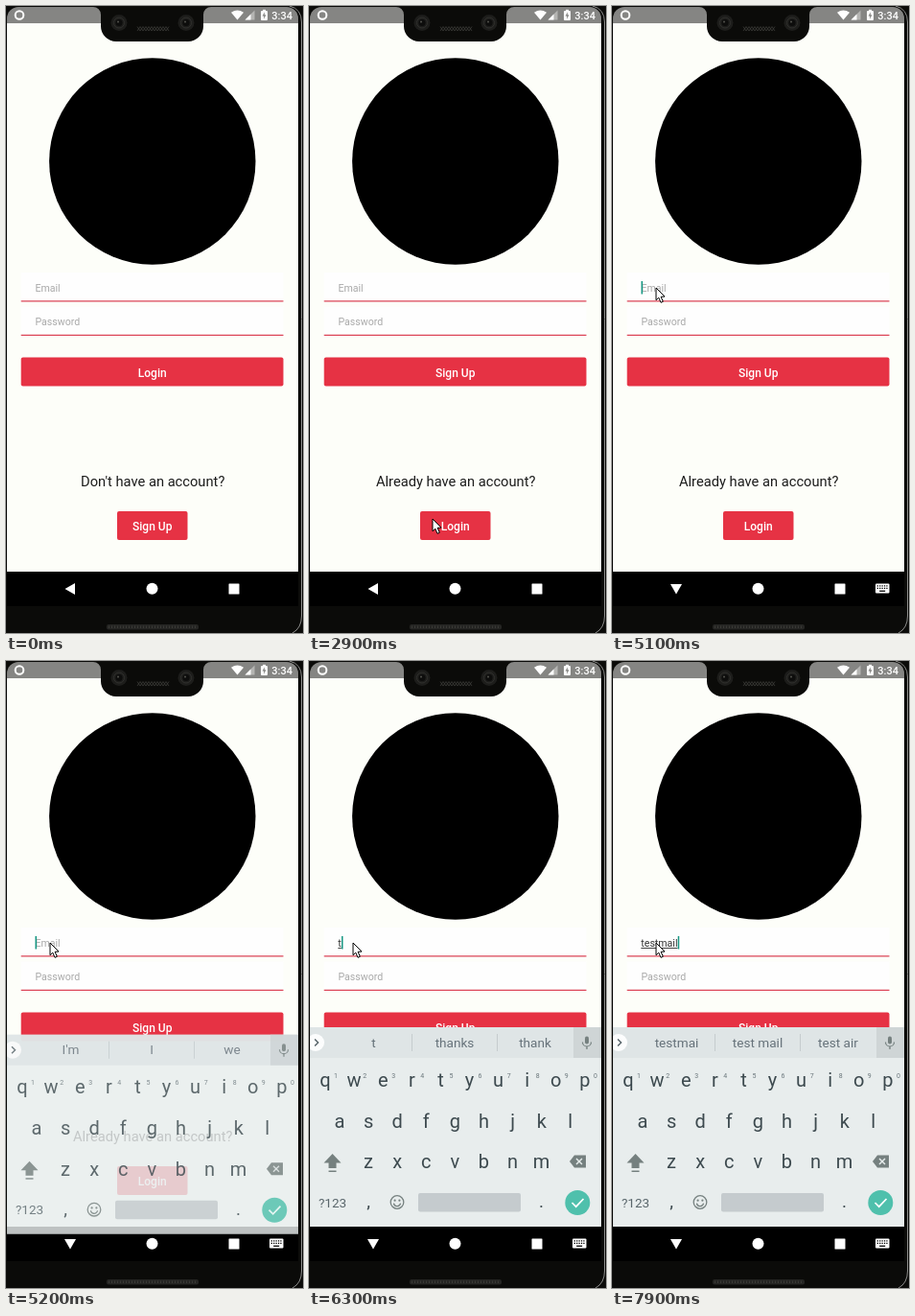
Write an HTML page with a canvas that moves like this. It is 310 by 654 pixels and loops after 8000 ms.

```html
<!DOCTYPE html>
<html lang="en">
<head>
<meta charset="utf-8">
<title>Login screen</title>
<style>
html, body { margin: 0; width: 100%; height: 100%; overflow: hidden; background: #0b0b09; }
canvas { display: block; width: 310px; height: 654px; }
</style>
</head>
<body>
<canvas id="stage"></canvas>
<script>
const W = 310, H = 654, LOOP = 8000, STEP = 100;
const RED = '#e63244', PAGE = '#fdfef9', KEY = '#3d4a4f', ICON = '#75807f', TEAL = '#4fc0ac';
const BODY = '#0b0b09', BAR = '#858583';
const canvas = document.getElementById('stage');
const ctx = canvas.getContext('2d');
const dpr = window.devicePixelRatio || 1;
canvas.width = W * dpr;
canvas.height = H * dpr;

// time, x, y of the pointer; no position hides it
const pointerPath = [
  [500, 83, 543], [600, 100, 543], [700, 122, 544], [800, 138, 543], [900, 131, 541],
  [2900, 128, 535], [3000, 98, 490], [3100, 55, 438], [3200],
  [3400, 34, 290], [3500, 43, 287], [3700, 44, 288], [3800, 45, 290], [4200, 45, 292], [4400, 45, 294]
];
const typing = [
  [6300, 't'], [6400, 'te'], [6700, 'tes'], [7000, 'test'], [7400, 'testm'],
  [7600, 'testma'], [7700, 'testmai'], [7900, 'testmail']
];
const hints = [
  [0, "I'm", 'I', 'we'],
  [6300, 't', 'thanks', 'thank'],
  [6400, 'te', 'the', 'tell'],
  [6700, 'tes', 'test', 'tea'],
  [7100, 'test', 'tests', 'testing'],
  [7400, 'testm', 'test', 'tests'],
  [7600, 'testma', 'test ma', 'test me'],
  [7700, 'testmai', 'test mail', 'test air']
];

const latest = (list, t) => list.filter(row => row[0] <= t).pop();

function rect(x, y, w, h, color, r = 0) {
  ctx.fillStyle = color;
  ctx.beginPath();
  ctx.roundRect(x, y, w, h, r);
  ctx.fill();
}

function disc(x, y, r, color) {
  ctx.fillStyle = color;
  ctx.beginPath();
  ctx.arc(x, y, r, 0, Math.PI * 2);
  ctx.fill();
}

function ring(x, y, r, color, width) {
  ctx.strokeStyle = color;
  ctx.lineWidth = width;
  ctx.beginPath();
  ctx.arc(x, y, r, 0, Math.PI * 2);
  ctx.stroke();
}

function trace(points) {
  ctx.beginPath();
  for (let i = 0; i < points.length; i += 2) ctx.lineTo(points[i], points[i + 1]);
}

function poly(points, color) {
  trace(points);
  ctx.closePath();
  ctx.fillStyle = color;
  ctx.fill();
}

function line(points, color, width) {
  trace(points);
  ctx.strokeStyle = color;
  ctx.lineWidth = width;
  ctx.stroke();
}

function text(s, x, y, size, color, align = 'center', weight = 400) {
  ctx.font = `${weight} ${size}px Roboto, sans-serif`;
  ctx.textAlign = align;
  ctx.fillStyle = color;
  ctx.fillText(s, x, y);
}

function button(label, x, y, w) {
  rect(x, y, w, 30, RED, 2);
  text(label, 152.7, y + 20, 12, '#fff', 'center', 500);
}

function field(y, label) {
  rect(15.7, y, 273.8, 29, '#fefefe');
  rect(15.7, y + 29.2, 273.8, 1.3, '#dc4558');
  if (label) text(label, 30.4, y + 19.5, 10.6, '#a9a9a9', 'left');
}

function drawForm(t) {
  const signUp = t >= 1400;
  const typed = (latest(typing, t) || [0, ''])[1];
  rect(1, 18, 304, 572, PAGE);
  disc(152.8, 162, 107.7, '#000');

  field(278, typed ? '' : 'Email');
  field(313.5, 'Password');
  let caretX = 30.5;
  if (typed) {
    text(typed, 30.3, 297.7, 10.6, '#333', 'left');
    const w = ctx.measureText(typed).width;
    rect(30.3, 299, w, 1, '#444');
    caretX += w;
  }
  const caretOn = t >= 4900 && (typed || t < 5400 || t >= 5900);
  if (caretOn) rect(caretX, 287, 1.5, 13.5, '#159682');

  button(signUp ? 'Sign Up' : 'Login', 15.7, 366.5, 273.8);
  text(signUp ? 'Already have an account?' : "Don't have an account?", 153.2, 500.5, 14.7, '#1c1c1c');
  button(signUp ? 'Login' : 'Sign Up', 116, 527, 73.5);
}

function drawNav(t) {
  rect(1, 590, 304, 36, '#000');
  const turn = Math.min(Math.max((t - 4900) / 200, 0), 1);
  ctx.save();
  ctx.translate(67, 608);
  ctx.rotate(-turn * Math.PI / 2);
  poly([-5.5, 0, 5, -6, 5, 6], '#fff');
  ctx.restore();
  disc(152.5, 607.7, 6, '#fff');
  rect(232.5, 602.5, 11, 11, '#fff', 0.5);
  if (t >= 5000) drawKeyboardIcon();
}

function drawKeyboardIcon() {
  rect(275, 602.5, 14.5, 10, '#fff', 1);
  for (let row = 0; row < 2; row++)
    for (let col = 0; col < 5; col++) rect(276.7 + col * 2.4, 604.2 + row * 2.5, 1.3, 1.3, '#000');
  rect(279.2, 609.6, 6, 1.3, '#000');
}

function drawKeyboard(t) {
  if (t < 5200) return;
  const [drop, alpha] = t < 5300 ? [7.7, 0.82] : t < 5400 ? [2, 0.95] : [0, 1];
  ctx.save();
  ctx.globalAlpha = alpha;
  ctx.beginPath();
  ctx.rect(1, 381, 304, 217);
  ctx.clip();
  ctx.translate(0, drop);

  rect(1, 382, 304, 208, '#e8eded');
  rect(1, 382, 304, 32, '#dfe5e6');
  rect(276, 382, 29, 32, '#cfd5d6');
  disc(7, 398, 9, '#fcfdfd');
  line([6, 394.5, 9.5, 398, 6, 401.5], '#59666b', 1.5);
  latest(hints, t).slice(1).forEach((s, i) => text(s, [67.5, 152, 236][i], 402.7, 13.6, '#66727a'));
  rect(107, 389, 1, 18, '#c5ccce');
  rect(196, 389, 1, 18, '#c5ccce');
  drawMic();

  drawRow('qwertyuiop', 17, 443.5);
  [...'1234567890'].forEach((d, i) => text(d, 28 + i * 30.1, 435 - 0.5, 7, '#6a767b'));
  drawRow('asdfghjkl', 32, 486.5);
  drawRow('zxcvbnm', 62, 529);

  // shift
  poly([24.5, 514, 33.5, 523.5, 28.5, 523.5, 28.5, 529, 20.5, 529, 20.5, 523.5, 15.5, 523.5], ICON);
  rect(20.5, 531.5, 8, 1.5, ICON);
  // delete
  poly([272, 522, 277, 515.5, 289, 515.5, 289, 528.5, 277, 528.5], ICON);
  line([279, 519, 285, 525], '#e8eded', 1.4);
  line([285, 519, 279, 525], '#e8eded', 1.4);

  text('?123', 24.5, 569.5, 13.5, '#59666b');
  text(',', 62, 570, 19, KEY);
  ring(92, 564.5, 6.8, ICON, 1.3);
  disc(89.6, 562.7, 1.1, ICON);
  disc(94.4, 562.7, 1.1, ICON);
  ctx.beginPath();
  ctx.arc(92, 565, 3.6, 0.15, Math.PI - 0.15);
  ctx.stroke();
  rect(114, 555, 107, 19.5, '#c5cbce', 2);
  text('.', 242.5, 570, 19, KEY);
  disc(280.3, 565, 13, TEAL);
  line([274.5, 565, 278.7, 569.2, 286.5, 561], '#fff', 1.7);
  ctx.restore();
}

function drawRow(letters, x, y) {
  [...letters].forEach((c, i) => text(c, x + i * 30.1, y, 20, KEY));
}

function drawMic() {
  rect(288, 391.5, 4, 8, ICON, 2);
  ctx.strokeStyle = ICON;
  ctx.lineWidth = 1.2;
  ctx.beginPath();
  ctx.arc(290, 397.5, 4.5, 0, Math.PI);
  ctx.stroke();
  line([290, 402, 290, 405], ICON, 1.3);
}

function drawStatus() {
  rect(1, 1, 304, 17, BAR, [12, 12, 0, 0]);
  ring(14, 9.5, 4.3, '#fff', 2);
  ctx.fillStyle = '#fff';
  ctx.beginPath();
  ctx.moveTo(241.5, 14.5);
  ctx.lineTo(235, 6.8);
  ctx.quadraticCurveTo(241.5, 2.2, 248, 6.8);
  ctx.fill();
  poly([249.5, 14.5, 259.5, 14.5, 259.5, 4.5], '#b5b5b3');
  poly([249.5, 14.5, 255.5, 14.5, 255.5, 8.5], '#fff');
  rect(266, 5, 7, 10, '#fff', 1);
  rect(268, 3.8, 3, 2, '#fff');
  poly([270, 6.3, 267.5, 10.6, 269.2, 10.6, 269, 13.7, 271.5, 9.3, 269.8, 9.3], BAR);
  text('3:34', 299, 13.6, 11, '#fff', 'right', 500);
}

function drawNotch() {
  ctx.fillStyle = BODY;
  ctx.beginPath();
  ctx.moveTo(91, 0);
  ctx.lineTo(91, 1);
  ctx.arcTo(99, 1, 99, 9, 8);
  ctx.arcTo(99, 37, 115, 37, 16);
  ctx.arcTo(206, 37, 206, 21, 16);
  ctx.arcTo(206, 1, 214, 1, 8);
  ctx.lineTo(214, 0);
  ctx.fill();
}

function drawDevice() {
  drawNotch();
  for (const x of [118, 188]) {
    disc(x, 17.5, 8.5, '#1d1d1b');
    ring(x, 17.5, 5.5, '#30302d', 1);
    disc(x, 17.5, 3.5, '#0d0d0c');
    disc(x - 1, 16.5, 1, '#55554f');
  }
  for (let i = 0; i < 11; i++) {
    const x = 137 + i * 3;
    line([x, 21.5, x + 3, 26], '#44443f', 0.7);
    line([x + 3, 21.5, x, 26], '#44443f', 0.7);
  }
  rect(105, 645, 96, 5.5, '#252523', 2);
  for (let x = 107; x < 200; x += 3) rect(x, 646.5, 1, 2.5, '#3a3a36');

  // light rim on the right side
  ctx.strokeStyle = '#8c8c8a';
  ctx.lineWidth = 1;
  ctx.beginPath();
  ctx.moveTo(296, 0);
  ctx.quadraticCurveTo(308.5, 3, 308.5, 17);
  ctx.lineTo(308.5, 636);
  ctx.quadraticCurveTo(308.5, 649, 299, 654);
  ctx.stroke();
}

function drawPointer(t) {
  const [, x, y] = latest(pointerPath, t) || [];
  if (x === undefined) return;
  ctx.save();
  ctx.translate(x + 1, y);
  poly([0, 0, 0, 12.8, 2.8, 10.2, 5, 15.3, 7.3, 14.3, 5.1, 9.3, 9, 9.1], '#fff');
  ctx.strokeStyle = '#000';
  ctx.lineWidth = 1;
  ctx.stroke();
  ctx.restore();
}

function draw(now) {
  const t = Math.floor((now % LOOP) / STEP) * STEP;
  ctx.setTransform(dpr, 0, 0, dpr, 0, 0);
  rect(0, 0, W, H, BODY);
  drawForm(t);
  drawNav(t);
  drawKeyboard(t);
  drawStatus();
  drawDevice();
  drawPointer(t);
}

let start;
function tick(now) {
  start ??= now;
  draw(now - start);
  requestAnimationFrame(tick);
}
draw(0);
requestAnimationFrame(tick);
</script>
</body>
</html>
```
